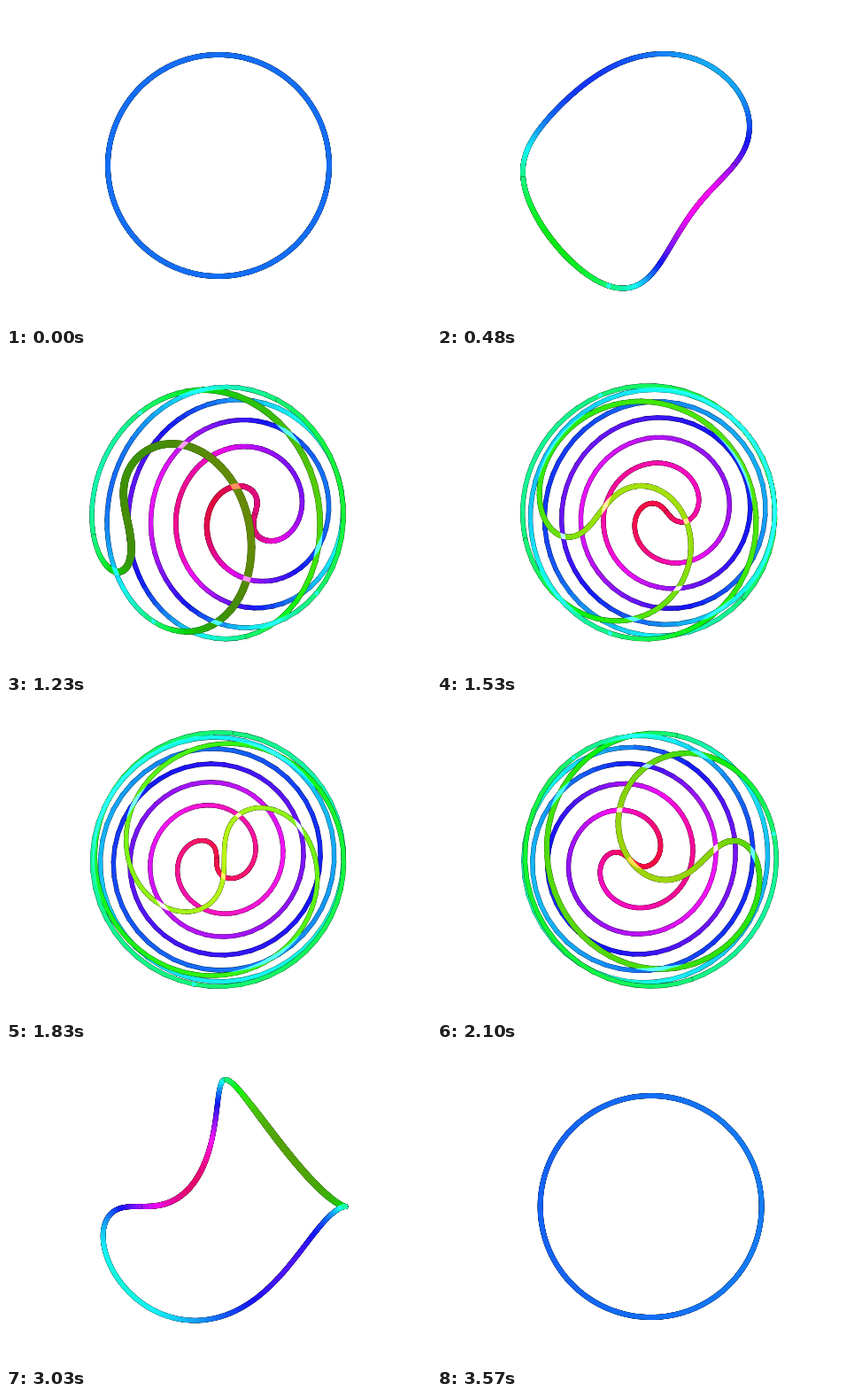
An HTML page with a canvas for the animation above (3600 ms loop, 480 by 360 pixels).

```html
<!DOCTYPE html>
<html lang="en">
<head>
<meta charset="utf-8">
<title>Twisting loop on a sphere</title>
<style>
  html, body { margin: 0; width: 100%; height: 100%; overflow: hidden; background: #fff; }
  canvas { display: block; width: 480px; height: 360px; }
</style>
</head>
<body>
<canvas id="stage" width="480" height="360"></canvas>
<script>
const LOOP = 3600, STEP = 30, W = 480, H = 360;
const CX = 240, CY = 180, R = 125, PERSP = 0.49, RIM = 0.49;
const PARTS = 560;

const ctx = document.getElementById('stage').getContext('2d');
const layer = document.createElement('canvas');
layer.width = W;
layer.height = H;
const pen = layer.getContext('2d');
pen.lineCap = 'round';

const clamp = v => Math.max(0, Math.min(1, v));
const smooth = (lo, hi, v) => {
  const k = clamp((v - lo) / (hi - lo));
  return k * k * (3 - 2 * k);
};

// Great circle twisted about the x axis, then turned about the y axis.
function pose(time) {
  const turn = Math.PI * time / LOOP;
  const c = Math.cos(turn), s = Math.sin(turn);
  const a = 1 - Math.abs(1 - 2 * time / LOOP);
  const twist = 4 * Math.PI * s * s * smooth(0.05, 0.55, a);
  const swell = clamp(1 - ((a - 0.53) / 0.36) ** 2);
  const base = 6 - 0.7 * s * s;

  return u => {
    const x = Math.cos(u), r = Math.sin(u);
    const y = r * Math.cos(twist * x);
    const z = -r * Math.sin(twist * x);
    const px = x * c + z * s;
    const pz = z * c - x * s;
    const zoom = R / (1 - PERSP * pz);
    const polar = swell * smooth(0.3, 0.7, Math.abs(x));
    const near = polar * smooth(0.5, 0.92, pz);
    const far = polar * smooth(0.3, 0.9, -pz);
    return {
      x: CX + px * zoom,
      y: CY + y * zoom,
      front: pz > RIM,
      hue: 216 - (pz > 0 ? 140 : 130) * pz,
      light: 52 - 29 * near - 8 * far,
      width: base + 4 * near + far
    };
  };
}

function strokePart(p, q, color, width) {
  pen.strokeStyle = color;
  pen.lineWidth = width;
  pen.beginPath();
  pen.moveTo(p.x, p.y);
  pen.lineTo(q.x, q.y);
  pen.stroke();
}

function drawRun(pts) {
  pen.clearRect(0, 0, W, H);
  for (let i = 1; i < pts.length; i++) {
    const p = pts[i];
    strokePart(pts[i - 1], p, `hsl(${p.hue}, 90%, 15%)`, p.width);
  }
  for (let i = 1; i < pts.length; i++) {
    const p = pts[i];
    strokePart(pts[i - 1], p, `hsl(${p.hue}, 92%, ${p.light}%)`, p.width - 0.7);
  }
  // Near runs glow over what is already there; far runs slip beneath it.
  ctx.globalCompositeOperation = pts[1].front ? 'lighter' : 'destination-over';
  ctx.drawImage(layer, 0, 0);
}

function draw(time) {
  const at = pose(time);
  ctx.clearRect(0, 0, W, H);
  let run = [at(0)];
  for (let i = 1; i <= PARTS; i++) {
    const p = at(2 * Math.PI * i / PARTS);
    const last = run[run.length - 1];
    if (run.length > 1 && p.front !== last.front) {
      drawRun(run);
      run = [last];
    }
    run.push(p);
  }
  drawRun(run);
}

const start = performance.now();
let shown = -1;
function tick() {
  const time = Math.floor((performance.now() - start) % LOOP / STEP) * STEP;
  if (time !== shown) draw(shown = time);
  requestAnimationFrame(tick);
}
tick();
</script>
</body>
</html>
```
